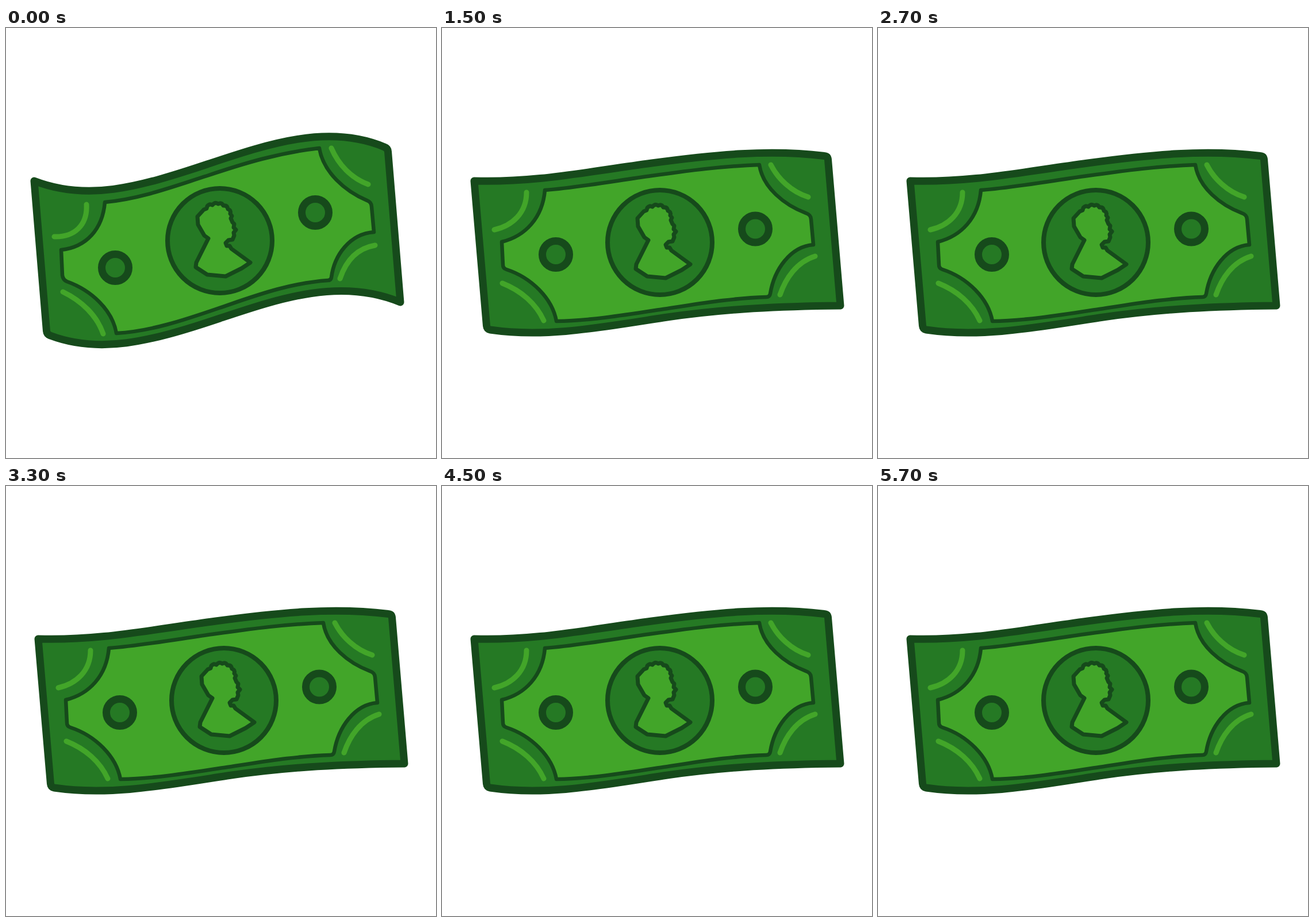
Animation of 748 by 748 pixels, one loop 6000 ms. Source, as an HTML page:

```html
<!DOCTYPE html>
<html lang="en">
<head>
<meta charset="utf-8">
<title>Waving banknote</title>
<style>
  html, body { margin: 0; width: 100%; height: 100%; overflow: hidden; background: #fff; }
  svg { display: block; width: 100%; height: 100%; }
  .note { --dark: #164a1b; --mid: #257924; --light: #42a529; }
  .note * { stroke: var(--dark); stroke-linejoin: round; stroke-linecap: round; fill: var(--mid); }
  #paper { stroke-width: 13; }
  #panel { stroke-width: 6.5; fill: var(--light); }
  #shine { stroke-width: 9; stroke: var(--light); fill: none; }
  .dot { stroke-width: 13; }
  #medal circle { stroke-width: 8; }
  #bust { stroke-width: 7; fill: var(--light); }
</style>
</head>
<body>
<svg class="note" viewBox="0 0 748 748">
  <path id="paper"/>
  <path id="panel"/>
  <path id="shine"/>
  <circle id="dotL" class="dot" r="23.5"/>
  <circle id="dotR" class="dot" r="23.5"/>
  <g id="medal">
    <circle r="91"/>
    <path id="bust" d="M-22-60Q-18-65-13-62Q-8-68-3-64Q3-67 6-61Q13-62 14-55Q20-53 18-47L21-43L19-39L22-32L25-29L24-23L28-19L24-14L25-9L22-2L15-1L10 4L12 9L17 9L20 14L53 38L38 48L10 62L-22 59L-42 46L-41 38L-20-4L-27-9L-38-28L-39-42L-28-54L-23-56Z"/>
  </g>
</svg>
<script>
const STEP = 300;

const high = {
  paper: `M49 266C140 301 225 279 350 237C455 202 560 166 658 207Q664 209 664.5 215
    L686 477C582 434 477 470 372 505C247 547 162 567 77 535Q71 533 70.5 527Z`,
  panel: `M172 303C235 297 290 276 350 257C415 235 475 217 545 209
    C552 251 590 284 628 300Q636 303 636 311L640 355C598 358 571 395 566 434Q565 439 560 439
    C490 444 430 467 371 487C310 508 250 528 192 531
    C185 490 148 456 106 441Q99 438 98 430L96 386C140 381 168 350 172 303Z`,
  shine: `M140 307C142 343 119 364 84 363M566 209C578 237 600 261 630 272
    M642 378C607 384 590 409 581 436M99 459C132 475 158 500 169 532`,
  dotL: [190, 417], dotR: [538, 321], medal: [372, 370, 0]
};

const mid = {
  paper: `M56 266C160 269 240 252 365 235C475 220 570 211 665 222.5Q671 223 671.5 229
    L693 483C590 484 495 488 385 504C275 521 180 539 84 525Q78 524 77.5 518Z`,
  panel: `M179 282C240 277 300 266 365 257C430 248 490 240 552 238
    C558 278 596 308 633 322Q642 325 642 333L646 377C606 380 578 420 571 462Q570 468 564 468
    C500 470 440 481 385 489C320 499 260 509 199 510
    C192 470 155 434 112 420Q106 418 106 412L104 372C145 362 175 330 179 282Z`,
  shine: `M147 286C147 322 122 344 91 351M572 238C584 262 608 285 637 294
    M649 397C617 407 598 435 588 464M105 444C138 457 164 480 177 509`,
  dotL: [198, 394], dotR: [545, 349.5], medal: [379, 373, 0]
};

const low = {
  paper: `M55 264C120 225 215 210 350 234C470 254 565 272 665 213
    L687.5 475Q688 481 682 484C590 537 490 524 372 505C245 483 155 482 73 531
    L50.5 271Q50 267 55 264Z`,
  panel: `M167 242C240 236 300 246 360 256C420 266 490 272 551 271
    C566 310 595 339 639 340L643 384Q643 390 637 393C600 414 574 455 573 498
    C500 505 440 497 372 486C310 476 250 466 190 471
    C178 432 148 402 100 404L96 358Q96 352 102 348C140 322 165 285 167 242Z`,
  shine: `M146 246C137 281 119 306 94 320M582 269C591 301 614 317 647 314
    M649 411C621 431 601 462 592 495M100 426C132 426 155 446 170 473`,
  dotL: [192, 352], dotR: [551, 386], medal: [373, 370, -9.5]
};

const poses = [high, mid, low, mid];
const el = id => document.getElementById(id);
let shown;

function draw(ms) {
  const pose = poses[Math.floor(ms / STEP) % poses.length];
  if (pose === shown) return;
  shown = pose;
  for (const id of ["paper", "panel", "shine"]) el(id).setAttribute("d", pose[id]);
  for (const id of ["dotL", "dotR"]) el(id).setAttribute("transform", `translate(${pose[id]})`);
  const [x, y, turn] = pose.medal;
  el("medal").setAttribute("transform", `translate(${x} ${y}) rotate(${turn})`);
}

const start = performance.now();
function tick() {
  draw(performance.now() - start);
  requestAnimationFrame(tick);
}
tick();
</script>
</body>
</html>
```
